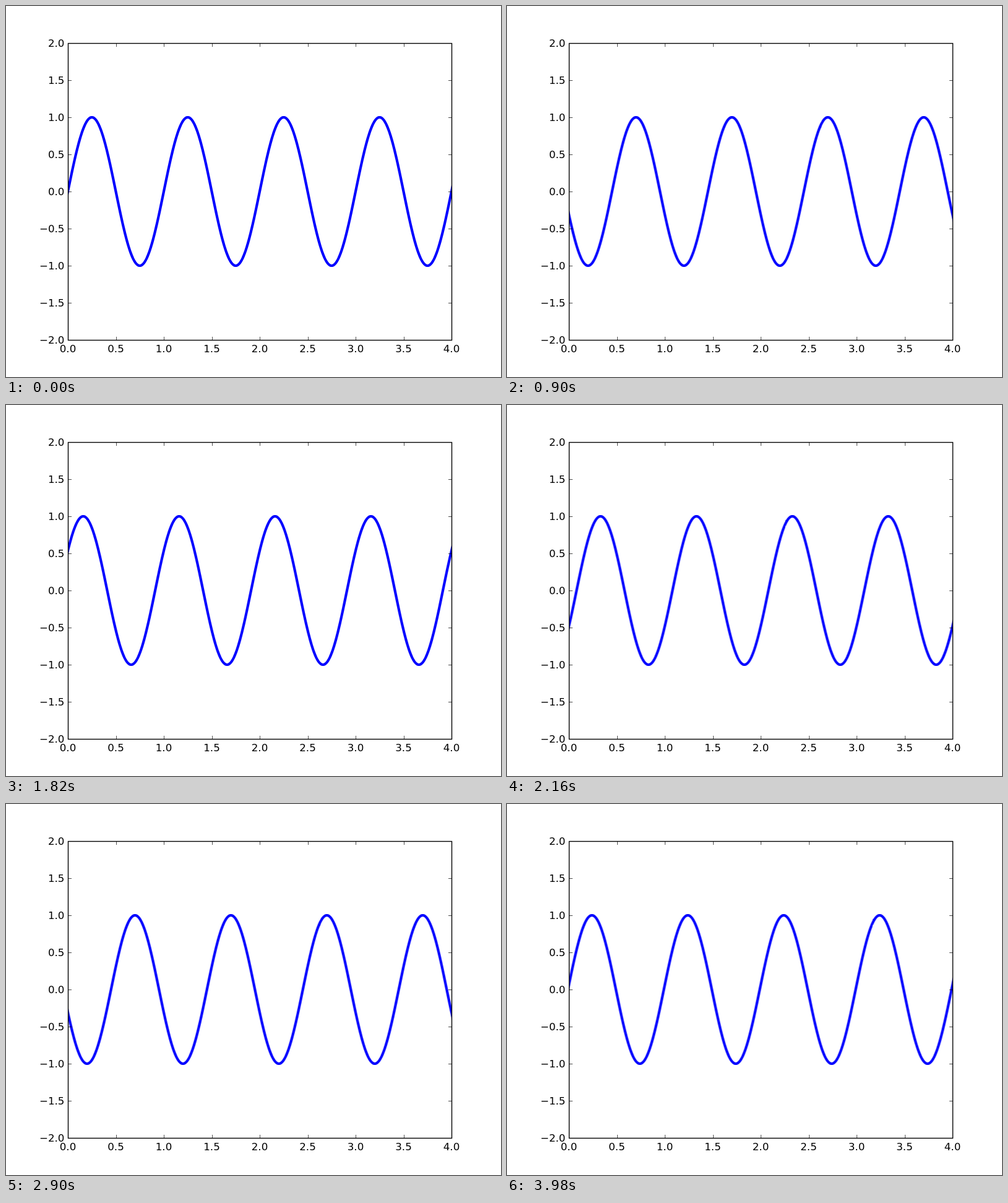
An HTML page for the animation above (4000 ms loop, 800 px wide and 600 px high).

```html
<!DOCTYPE html>
<html lang="en">
<head>
<meta charset="utf-8">
<title>Travelling sine wave</title>
<style>
  html, body { margin: 0; width: 100%; height: 100%; overflow: hidden; background: #fff; }
  svg { display: block; width: 800px; height: 600px; }
  text { font: 16.667px "DejaVu Sans", Verdana, sans-serif; fill: #000; }
  .x { text-anchor: middle; }
  .y { text-anchor: end; }
  #wave {
    fill: none; stroke: #00f; stroke-width: 4.167; stroke-linejoin: round;
    animation: travel 2s steps(100) infinite;
  }
  #ticks { fill: none; stroke: #000; stroke-width: .694; }
  #box { fill: none; stroke: #000; stroke-width: 1.389; }
  /* one wavelength per cycle */
  @keyframes travel { to { transform: translateX(155px); } }
</style>
</head>
<body>
<svg viewBox="0 0 800 600">
  <clipPath id="plot"><rect x="100" y="60" width="620.5" height="480"/></clipPath>
  <g clip-path="url(#plot)"><path id="wave"/></g>
  <path id="ticks"/>
  <rect id="box" x="100.5" y="60.5" width="620" height="480"/>
  <g id="labels"></g>
</svg>
<script>
  const LEFT = 100, RIGHT = 720, TOP = 60, BOTTOM = 540, MID = 300;
  const UNIT_X = 155, UNIT_Y = 120, TICK = 5.56;
  const byId = id => document.getElementById(id);

  const points = [];
  for (let x = -1.1; x <= 4.1; x += 0.005) {
    const y = MID - UNIT_Y * Math.sin(2 * Math.PI * x);
    points.push(`${(LEFT + UNIT_X * x).toFixed(3)} ${y.toFixed(3)}`);
  }
  byId("wave").setAttribute("d", "M" + points.join("L"));

  let ticks = "";
  function label(kind, x, y, value) {
    const node = document.createElementNS("http://www.w3.org/2000/svg", "text");
    node.setAttribute("class", kind);
    node.setAttribute("x", x);
    node.setAttribute("y", y);
    node.textContent = value.toFixed(1).replace("-", "\u2212");
    byId("labels").append(node);
  }

  for (let i = 0; i <= 8; i++) {
    const x = LEFT + UNIT_X * i / 2;
    const y = TOP + UNIT_Y * i / 2;
    const px = Math.round(x) + 0.5;
    const py = y + 0.5;
    ticks += `M${px} ${BOTTOM + 0.5}v${-TICK}M${px} ${TOP + 0.5}v${TICK}`;
    ticks += `M${LEFT + 0.5} ${py}h${TICK}M${RIGHT + 0.5} ${py}h${-TICK}`;
    label("x", x, BOTTOM + 20, i / 2);
    label("y", LEFT - TICK, y + 6, 2 - i / 2);
  }
  byId("ticks").setAttribute("d", ticks);
</script>
</body>
</html>
```
